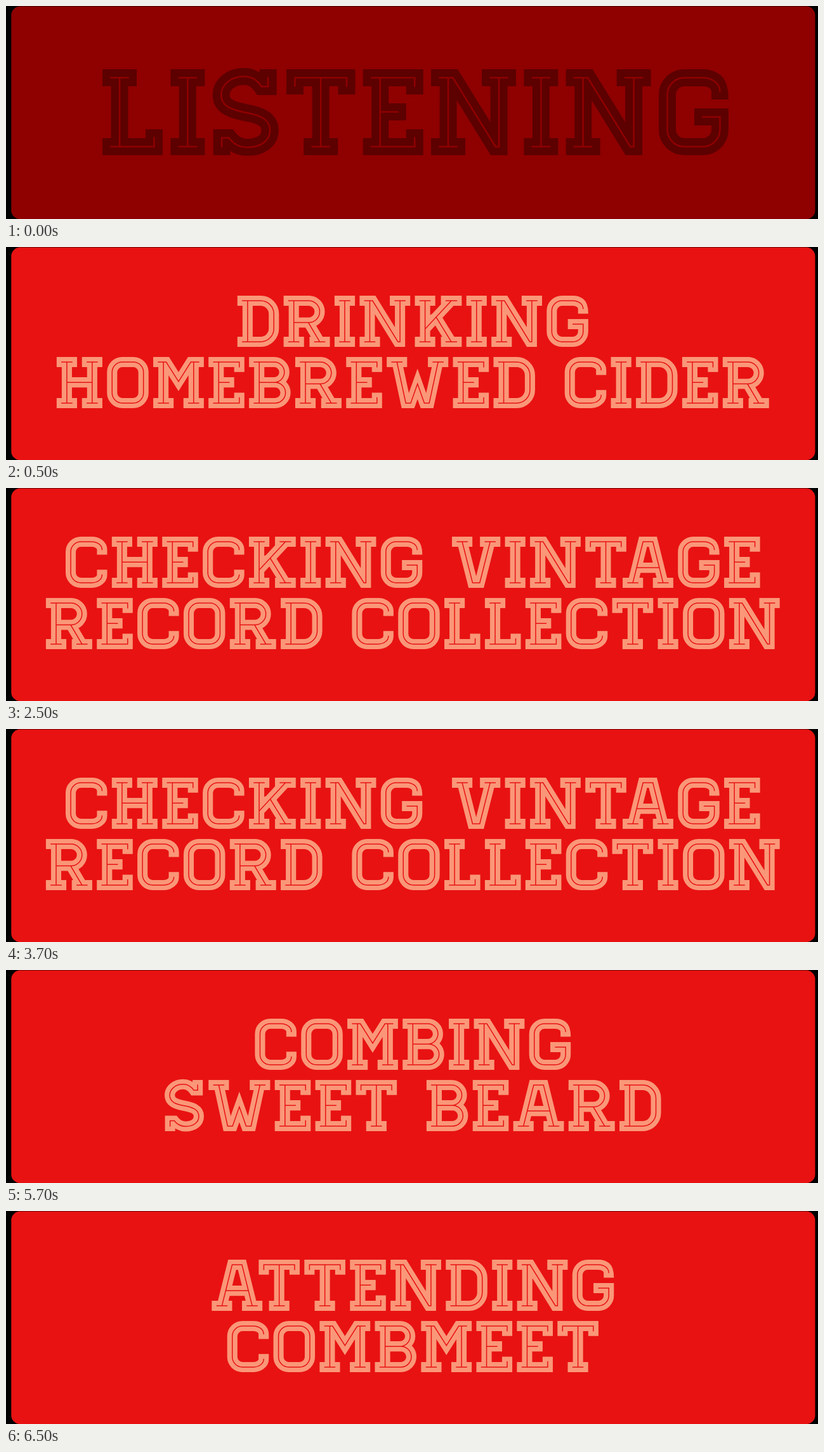
An HTML page that plays this animation: 1280x337 px, repeating every 8 s.

```html
<!DOCTYPE html>
<html lang="en">
<head>
<meta charset="utf-8">
<title>Status sign</title>
<style>
  html, body { margin: 0; width: 100%; height: 100%; overflow: hidden; background: #000; }
  svg { display: block; width: 100vw; height: 100vh; }
  path { fill: none; stroke-linecap: square; stroke-miterlimit: 4; }
</style>
</head>
<body>
<svg viewBox="0 0 1280 337" role="img">
  <clipPath id="band"><rect x="-30" y="-13.5" width="220" height="136"/></clipPath>
  <rect id="card" x="8.3" y="0.6" width="1267.2" height="336.6" rx="14"/>
  <g id="sign"></g>
</svg>
<script>
const WEIGHT = 27, INLINE = 2.5, GAP = 12.3, SPACE = 78.5, TA_KERN = -22;

// Letter skeletons: [width between outer stroke centres, path], cap height 109.
const stem = 'M13.5,0V109';
const GLYPHS = {
  A: [107, 'M0,109H27M80,109H107M13.5,109L40.5,0H66.5L93.5,109M23.5,69L40.5,0H66.5L83.5,69Z'],
  B: [83, stem + 'M0,0H53A27,27 0 0 1 53,54H13.5M53,54H55.5A27.5,27.5 0 0 1 55.5,109H0'],
  C: [83, 'M83,21A27,21 0 0 0 56,0H27A27,27 0 0 0 0,27V82A27,27 0 0 0 27,109H56A27,21 0 0 0 83,88'],
  D: [83, stem + 'M0,0H48A35,35 0 0 1 83,35V74A35,35 0 0 1 48,109H0'],
  E: [68, stem + 'M0,0H68V13M13.5,54H41M0,109H68V95'],
  G: [83, 'M83,21A27,21 0 0 0 56,0H27A27,27 0 0 0 0,27V82A27,27 0 0 0 27,109H56A27,27 0 0 0 83,82V62H56'],
  H: [94, stem + 'M80.5,0V109M0,0H27M67,0H94M0,109H27M67,109H94M13.5,54H80.5'],
  I: [27, stem + 'M0,0H27M0,109H27'],
  K: [97, stem + 'M0,0H27M0,109H27M69,0H97M69,109H97M13.5,100V75L83,0M43,44L83,109'],
  L: [68, stem + 'M0,0H27M0,109H68V95'],
  M: [107, stem + 'M93.5,0V109M0,0H20.9L53.5,52L86.1,0H107M0,109H27M80,109H107'],
  N: [107, stem + 'M0,0H20.9L88,109H93.5V0M80,0H107M0,109H27'],
  O: [83, 'M27,0H56A27,27 0 0 1 83,27V82A27,27 0 0 1 56,109H27A27,27 0 0 1 0,82V27A27,27 0 0 1 27,0Z'],
  R: [95.5, stem + 'M0,0H53A29,29 0 0 1 53,58H13.5M13.5,58H52L82,109M0,109H27M68.5,109H95.5'],
  S: [77, 'M74,0V14H64C56,3 48,-2 36,-2C14,-2 0,12 0,27C0,46 18,51 38,55C60,59 77,65 77,83C77,100 62,110 42,110C28,110 20,105 12,95H1V109'],
  T: [81.5, 'M0,13V0H81.5V13M40.75,0V109M27.25,109H54.25'],
  V: [101, 'M0,0H27M74,0H101M13.5,0L41,109H60L87.5,0'],
  W: [136, 'M0,0H27M109,0H136M13.5,0L37,109H50L68,58L86,109H99L122.5,0']
};

const DIM = { card: '#8f0000', ink: '#5d0000' };
const LIT = { card: '#e81212', ink: '#fa9778' };
const SMALL = 81 / 136;

const row = (text, y, scale = SMALL, centre = 641.3) => ({ text, y, scale, centre });
const pair = (first, second) => [row(first, 85), row(second, 182)];

const SCENES = [
  { end: 500, look: DIM, rows: [row('LISTENING', 113.5, 1, 645.5)] },
  { end: 2500, look: LIT, rows: pair('DRINKING', 'HOMEBREWED CIDER') },
  { end: 4500, look: LIT, rows: pair('CHECKING VINTAGE', 'RECORD COLLECTION') },
  { end: 6500, look: LIT, rows: pair('COMBING', 'SWEET BEARD') },
  { end: 8000, look: LIT, rows: pair('ATTENDING', 'COMBMEET') }
];
const LOOP = SCENES[SCENES.length - 1].end;

function layout(text) {
  const letters = [];
  let x = 0, right = 0;
  [...text].forEach((char, i) => {
    if (char === ' ') {
      x += SPACE - GAP;
      return;
    }
    if (/TA|AT/.test(text.slice(Math.max(i - 1, 0), i + 1))) x += TA_KERN;
    const [width, d] = GLYPHS[char];
    const clip = 'AKRVW'.includes(char) ? ' clip-path="url(#band)"' : '';
    letters.push(`<g transform="translate(${x + WEIGHT / 2} 0)"><path d="${d}"${clip}/></g>`);
    right = x + width + WEIGHT;
    x = right + GAP;
  });
  return { markup: letters.join(''), width: right };
}

function drawRow({ text, y, scale, centre }, look) {
  const { markup, width } = layout(text);
  const left = centre - width * scale / 2;
  return `<g transform="translate(${left} ${y}) scale(${scale})">
    <g stroke="${look.ink}" stroke-width="${WEIGHT}">${markup}</g>
    <g stroke="${look.card}" stroke-width="${INLINE}">${markup}</g></g>`;
}

const svg = document.querySelector('svg');
const card = document.getElementById('card');
const sign = document.getElementById('sign');
let shown;

function render(time) {
  const scene = SCENES.find(({ end }) => time % LOOP < end);
  if (scene !== shown) {
    shown = scene;
    card.setAttribute('fill', scene.look.card);
    sign.innerHTML = scene.rows.map(line => drawRow(line, scene.look)).join('');
    svg.setAttribute('aria-label', scene.rows.map(line => line.text).join(' '));
  }
}

const start = performance.now();
function tick() {
  render(performance.now() - start);
  requestAnimationFrame(tick);
}
tick();
</script>
</body>
</html>
```
